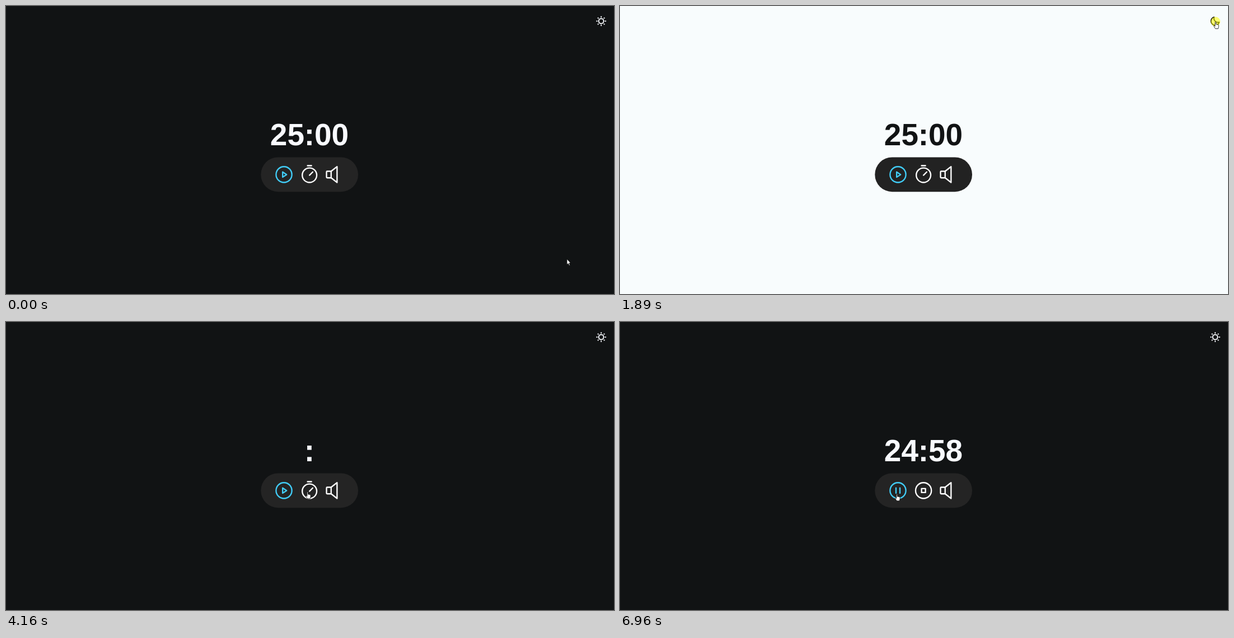
Recreate the animation shown at these times as an HTML page. Size 1086 by 515 pixels, loop 8 s.

```html
<!DOCTYPE html>
<html lang="en">
<head>
<meta charset="utf-8">
<title>Focus timer</title>
<style>
  html, body { margin: 0; width: 100%; height: 100%; overflow: hidden; }
  body { --bg: #111314; --ink: #f8faff; --pill: #242424; background: var(--bg); }
  body.light { --bg: #f8fcfd; --ink: #111314; --pill: #222; }
  svg { display: block; width: 100%; height: 100%; }
  text { font: bold 54.9px "Liberation Sans", Arial, sans-serif; text-anchor: middle; fill: var(--ink); }
  .icon { fill: none; stroke: #fff; stroke-width: 16; stroke-linecap: round; stroke-linejoin: round; }
  .blue { stroke: #41cdf8; }
  .theme { stroke: var(--ink); stroke-width: 25; }
  .pointer { fill: #fff; stroke: #000; stroke-width: .8; stroke-linejoin: round; }
</style>
</head>
<body>
<svg viewBox="0 0 1086 515">
  <g id="sun" class="icon theme" transform="translate(1063.1 27) scale(.08)">
    <circle r="56"/>
  </g>
  <path id="moon" class="icon theme" transform="translate(1063.1 27) scale(.08) translate(-128 -128)"
    d="M216.7 152.6A91.9 91.9 0 0 1 103.4 39.3A92 92 0 1 0 216.7 152.6Z"/>

  <text id="minutes" x="502.4" y="249"></text>
  <text x="542" y="249">:</text>
  <text id="seconds" x="581.6" y="249"></text>
  <rect id="ring" y="197.5" height="65" rx="2.5" fill="none" stroke="#fff" opacity=".7"/>
  <rect id="caret" y="199" width="1" height="62" fill="#fff" opacity=".6"/>

  <rect x="455.3" y="270.5" width="173.7" height="61.7" rx="30.8" fill="var(--pill)"/>
  <g class="icon blue" transform="translate(496.5 301.4) scale(.147)">
    <circle r="96"/>
    <path id="play" d="M32 0L-16 -32V32Z"/>
    <path id="pause" d="M-24 -32V32M24 -32V32"/>
  </g>
  <g class="icon" transform="translate(542.1 301.4) scale(.147)">
    <path id="timer" d="M-88 8a88 88 0 1 0 176 0a88 88 0 1 0 -176 0M0 8L39.6 -31.6M-24 -108H24"/>
    <g id="stop"><circle r="96"/><rect x="-24" y="-24" width="48" height="48"/></g>
  </g>
  <path class="icon" transform="translate(587.8 301.4) scale(.147)"
    d="M-48 40H-96a8 8 0 0 1 -8 -8V-32a8 8 0 0 1 8 -8H-48L24 -96V96L-48 40V-40"/>

  <circle id="click" r="8.4" fill="#ff0" opacity=".55"/>
  <path id="arrow" class="pointer" d="M.4 .4V10.6L2.8 8.4L4.4 12.2L6 11.5L4.5 7.8H7.4Z"/>
  <path id="hand" class="pointer" d="M-.9 1.4a.9 .9 0 0 1 1.8 0V5c.1 -.6 1.5 -.5 1.6 .2c.2 -.5 1.4 -.3 1.5 .4c.4 -.4 1.4 -.1 1.4 .7V9.4L4.5 12.6H-.3L-2.9 8.6C-3.6 7.5 -2.4 6.7 -1.7 7.4L-.9 8.3Z"/>
</svg>
<script>
const LOOP = 8000;
const el = Object.fromEntries([...document.querySelectorAll('[id]')].map(node => [node.id, node]));

for (let angle = 0; angle < 360; angle += 45) {
  const ray = document.createElementNS('http://www.w3.org/2000/svg', 'path');
  ray.setAttribute('d', 'M0 -92V-100');
  ray.setAttribute('transform', `rotate(${angle})`);
  el.sun.append(ray);
}

// [start, minutes, seconds]
const digits = [
  [0, '25', '00'], [3630, '', ''], [4620, '2', '0'],
  [4950, '25', '00'], [5970, '24', '59'], [6960, '24', '58']
];
// [start, x] and [start, x, width]; no x means hidden
const carets = [[0], [3630, 503], [4160], [4620, 517], [4950, 532], [5500], [5970]];
const rings = [[0], [4620, 486.5, 32], [4950, 471.5, 62], [5970]];
const clicks = [[1340, 1410], [1890, 2020], [3570, 3630], [5900, 5970]];

const moves = [
  { start: 70, end: 860, steps: 12, from: [1001.5, 452], bend: [698, 230], to: [1046, 26.5] },
  { start: 930, end: 1140, steps: 4, from: [1046, 26.5], to: [1063.8, 28] },
  { start: 2290, end: 2970, steps: 11, from: [1063.8, 28], to: [538.7, 303.3] },
  { start: 5360, end: 5570, steps: 4, from: [538.7, 303.3], to: [494.7, 307.3] }
];

const within = (t, start, end) => t >= start && t < end;
const rowAt = (rows, t) => rows.findLast(row => row[0] <= t);
const show = (node, on) => node.style.display = on ? '' : 'none';

function pointerAt(t) {
  const { start, end, steps, from, bend, to } = moves.findLast(m => m.start <= t) || moves[0];
  const interval = (end - start) / (steps - 1);
  const step = Math.max(0, Math.min(steps, Math.floor((t - start) / interval + .001) + 1));
  const u = (1 - Math.cos(Math.PI * step / steps)) / 2;
  return from.map((a, i) => {
    const b = to[i], c = bend ? bend[i] : (a + b) / 2;
    return (1 - u) ** 2 * a + 2 * u * (1 - u) * c + u * u * b;
  });
}

function overButton([x, y]) {
  const onTheme = x > 1053 && y < 37;
  const onControl = Math.abs(y - 301.4) < 19 && [496.5, 542.1, 587.8].some(c => Math.abs(x - c) < 19);
  return onTheme || onControl;
}

function render(t) {
  const light = within(t, 1410, 2020), running = t >= 5970;
  document.body.className = light ? 'light' : '';
  show(el.sun, !light);
  show(el.moon, light);
  show(el.play, !running);
  show(el.timer, !running);
  show(el.pause, running);
  show(el.stop, running);

  const [, minutes, seconds] = rowAt(digits, t);
  el.minutes.textContent = minutes;
  el.seconds.textContent = seconds;

  const [, caretX] = rowAt(carets, t);
  show(el.caret, caretX);
  el.caret.setAttribute('x', caretX || 0);
  const [, ringX, ringWidth] = rowAt(rings, t);
  show(el.ring, ringX);
  el.ring.setAttribute('x', ringX || 0);
  el.ring.setAttribute('width', ringWidth || 0);

  const pointer = pointerAt(t), hover = overButton(pointer);
  for (const node of [el.arrow, el.hand, el.click])
    node.setAttribute('transform', `translate(${pointer})`);
  show(el.hand, hover);
  show(el.arrow, !hover);
  show(el.click, clicks.some(([start, end]) => within(t, start, end)));
}

const begin = performance.now();
function tick() {
  render((performance.now() - begin) % LOOP);
  requestAnimationFrame(tick);
}
tick();
</script>
</body>
</html>
```
